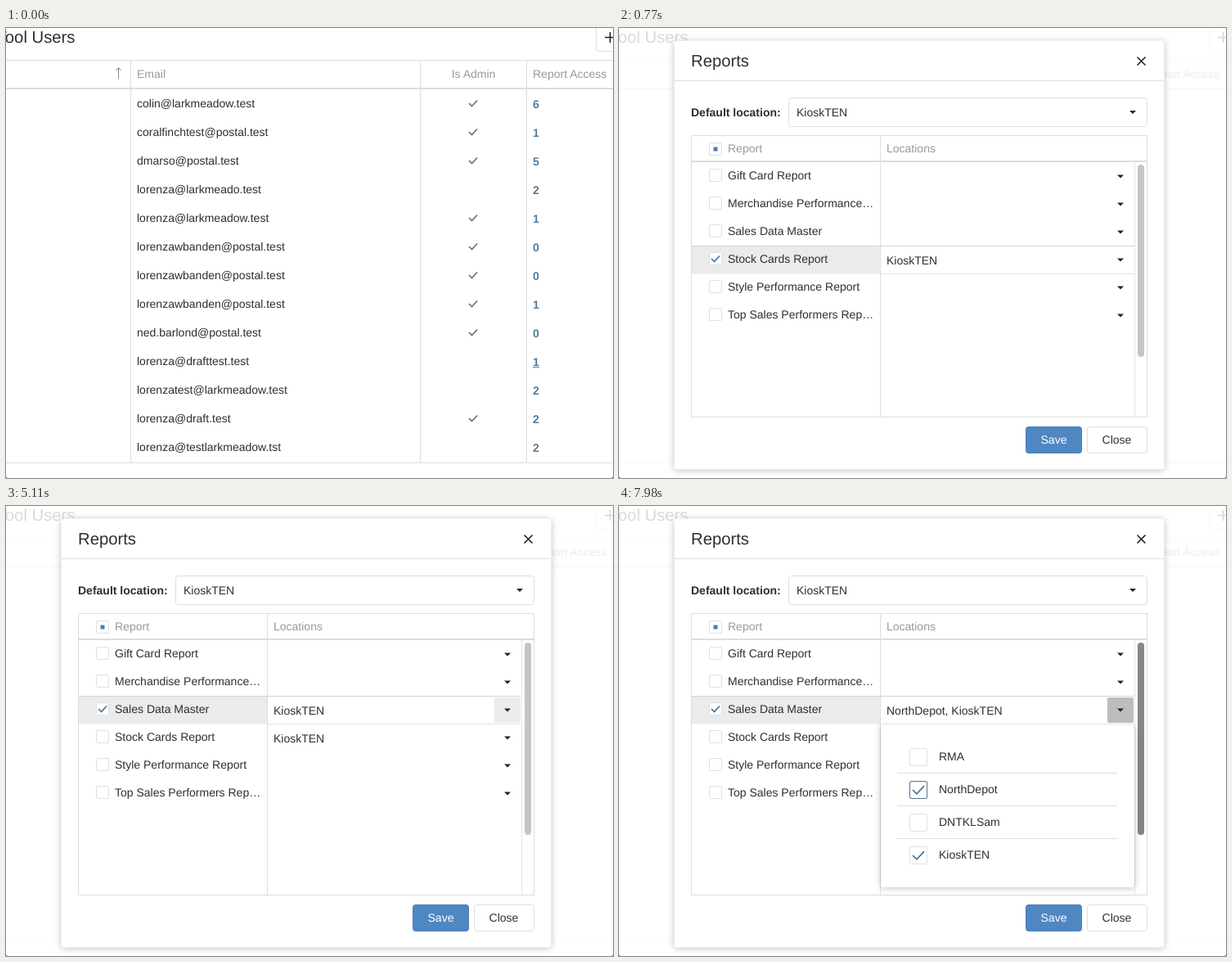
Animation, 742 px wide and 550 px high, one loop 8 s. Source, as an HTML page:

```html
<!DOCTYPE html>
<html lang="en">
<head>
<meta charset="utf-8">
<title>Report access</title>
<style>
  html, body { margin: 0; width: 100%; height: 100%; overflow: hidden; background: #fff; }
  svg { display: block; width: 742px; height: 550px; }
  text {
    font: 14px "Liberation Sans", Arial, sans-serif; fill: #2f2f2f;
    white-space: pre; text-rendering: geometricPrecision;
  }
  .big { font-size: 20.3px; }
  .bold { font-weight: bold; }
  .head { fill: #999; }
  .num { font-weight: bold; fill: #557a96; }
  .mid { text-anchor: middle; }
  .end { text-anchor: end; }
  .white { fill: #fff; }
  .box { fill: #fff; stroke: #e0e0e0; }
  .hover { fill: none; stroke: #4f7596; }
  .tick { fill: none; stroke: #4a7396; stroke-width: 1.7; }
  .dim { stroke: #5f7585; }
  .icon { fill: none; stroke: #222; stroke-width: 1.6; }
  .shade { filter: drop-shadow(0 1px 4px rgba(0, 0, 0, .25)); }
</style>
</head>
<body>
<svg id="stage" viewBox="0 0 742 550"></svg>
<script>
const LOOP = 8000, STEP = 70;

// Each change: start time, new value, number of steps it takes.
const tracks = {
  underline: [[0, 1], [140, 0]],
  mask: [[280, 1]],
  modal: [[280, .35], [420, 1, 2]],
  partial: [[0, 1], [2870, 0], [4060, 1]],
  hover3: [[2170, 1], [3430, 0, 3]],
  tick3: [[0, 1], [2660, 0]],
  row3: [[0, 1], [2870, 0]],
  hover2: [[3780, 1], [4340, 0, 3]],
  tick2: [[3990, 1]],
  row2: [[4060, 1]],
  one: [[4060, 1], [6790, 0]],
  both: [[6790, 1]],
  buttonHover: [[4480, 1, 3]],
  buttonOpen: [[5670, 1, 3]],
  itemHover1: [[5670, 1, 3]],
  itemTick1: [[6510, 1]],
  itemHover2: [[7070, 1], [7140, 0, 2]],
  itemHover3: [[7140, 1, 2], [7770, 0, 3]],
  bar: [[7770, 1, 4]]
};
const popupTrack = [[5180, 1, 2]];

const users = [
  ['colin@larkmeadow.test', 1, 6],
  ['coralfinchtest@postal.test', 1, 1],
  ['dmarso@postal.test', 1, 5],
  ['lorenza@larkmeado.test', 0, 2],
  ['lorenza@larkmeadow.test', 1, 1],
  ['lorenzawbanden@postal.test', 1, 0],
  ['lorenzawbanden@postal.test', 1, 0],
  ['lorenzawbanden@postal.test', 1, 1],
  ['ned.barlond@postal.test', 1, 0],
  ['lorenza@drafttest.test', 0, 1],
  ['lorenzatest@larkmeadow.test', 0, 2],
  ['lorenza@draft.test', 1, 2],
  ['lorenza@testlarkmeadow.tst', 0, 2]
];
const reports = ['Gift Card Report', 'Merchandise Performance…', 'Sales Data Master',
  'Stock Cards Report', 'Style Performance Report', 'Top Sales Performers Rep…'];
const places = ['RMA', 'NorthDepot', 'DNTKLSam', 'KioskTEN'];
const store = places[3];

const text = (x, y, s, cls = '') => `<text x="${x}" y="${y}" class="${cls}">${s}</text>`;
const rect = (x, y, w, h, attrs) => `<rect x="${x}" y="${y}" width="${w}" height="${h}" ${attrs}/>`;
const line = (d, color = '#ddd', width = 1) =>
  `<path d="${d}" fill="none" stroke="${color}" stroke-width="${width}"/>`;
const part = (id, s) => `<g id="${id}">${s}</g>`;
const caret = (x, y) => `<path d="M${x - 4} ${y - 2}h8l-4 4z" fill="#222"/>`;
const tick = (x, y, k = 1, cls = '') =>
  `<path class="tick ${cls}" d="M${x - 5 * k} ${y}l${3.5 * k} ${3.5 * k}l${6.5 * k} ${-7 * k}"/>`;
const box = (x, y, size, cls = 'box') =>
  rect(x - size / 2 + .5, y - size / 2 + .5, size - 1, size - 1, `rx="1.5" class="${cls}"`);

function page() {
  const rows = users.map(([mail, admin, count], i) => {
    const y = 97 + 35 * i;
    return text(160, y, mail) + text(644, y + 1, count, 'num') +
      (admin ? tick(571, y - 5, 1, 'dim') : '');
  }).join('');
  return text(84.5, 18, 'Tool Users', 'big end') +
    rect(721.5, -6.5, 40, 35, 'rx="3" fill="#fff" stroke="#ddd"') +
    '<path class="icon" d="M732 11.5h13M738.5 5v13"/>' +
    line('M0 39.5H742M152.5 39V531M506.5 39V531M636.5 39V531M0 531.5H742') +
    line('M0 74H742', '#ddd', 2) +
    line('M137.5 62V49M134.5 52l3-3.5l3 3.5', '#888') +
    text(160, 61, 'Email', 'head') + text(571.5, 61, 'Is Admin', 'head mid') +
    text(644, 61, 'Report Access', 'head') + rows +
    part('underline', line('M644 414.5h8', '#557a96'));
}

function selected(i) {
  const y = 164.5 + 34 * i;
  return rect(89, y, 230, 34, 'fill="#ebebeb"') +
    line(`M89 ${y}H630`, '#d4d4d4') + line(`M320 ${y + 34}H630`, '#e2e2e2');
}

function reportRow(name, i) {
  const y = 180 + 34 * i;
  let s = box(118, y, 16) + text(133, y + 5, name);
  if (i === 2 || i === 3)
    s += part('tick' + i, tick(118, y)) + part('hover' + i, box(118, y, 16, 'hover'));
  if (i === 2)
    s += part('buttonHover', rect(597, 234, 32, 31, 'rx="2" fill="#ebebeb"')) +
      part('buttonOpen', rect(597, 234, 32, 31, 'rx="2" fill="#bdbdbd"')) +
      part('one', text(327, 255, store)) +
      part('both', text(327, 255, `${places[1]}, ${store}`));
  if (i === 3) s += text(327, 289, store);
  return s + caret(613, y + 1.5);
}

function popup() {
  const items = places.map((name, i) => {
    const y = 307 + 40 * i;
    let s = text(391, y + 4, name) + box(366, y, 22);
    if (i === 1) s += part('itemTick1', tick(366, y, 1.4));
    if (i === 3) s += tick(366, y, 1.4);
    if (i) s += part('itemHover' + i, box(366, y, 22, 'hover')) + line(`M340 ${y - 20.5}H609`);
    return s;
  }).join('');
  return '<g clip-path="url(#drop)"><g id="popup">' +
    '<path class="shade" d="M320 267H630V462q0 4-4 4H324q-4 0-4-4z" fill="#fff"/>' +
    items + '</g></g>';
}

function dialog() {
  return rect(67.5, 15.5, 599, 524, 'rx="4" fill="#fff" class="shade"') +
    text(88, 47, 'Reports', 'big') + line('M68 64.5H666') +
    '<path class="icon" d="M633.5 35.5l10 10m0-10l-10 10"/>' +
    text(88, 108, 'Default location:', 'bold') +
    rect(207.5, 85.5, 438, 35, 'rx="3" fill="#fff" stroke="#ddd"') +
    text(217, 108, store) + caret(628, 103) +
    part('row2', selected(2)) + part('row3', selected(3)) +
    rect(88.5, 131.5, 557, 344, 'fill="none" stroke="#ddd"') +
    line('M319.5 131V475') + line('M630.5 164V475', '#e6e6e6') +
    line('M89 163H645', '#ddd', 2) +
    box(118, 148, 16) + part('partial', rect(115.5, 145.5, 5, 5, 'fill="#4a7fb6"')) +
    text(133, 152, 'Report', 'head') + text(327, 152, 'Locations', 'head') +
    reports.map(reportRow).join('') +
    rect(634, 167, 8, 235, 'rx="4" fill="#c5c5c5"') +
    part('bar', rect(634, 167, 8, 235, 'rx="4" fill="#868686"')) +
    rect(497.5, 487.5, 68, 32, 'rx="3" fill="#4f87c3" stroke="#477db8"') +
    text(531.5, 508, 'Save', 'mid white') +
    rect(572.5, 487.5, 73, 32, 'rx="3" fill="#fff" stroke="#ddd"') +
    text(608.5, 508, 'Close', 'mid') + popup();
}

const stage = document.getElementById('stage');
stage.innerHTML = '<clipPath id="drop"><path d="M308 267H642V482H308z"/></clipPath>' + page() +
  part('mask', rect(0, 0, 742, 550, 'fill="#fff" fill-opacity=".82"')) +
  part('modal', dialog()) +
  '<path d="M0 547q0 3 3 3H0zM742 547q0 3-3 3h3z" fill="#888"/>';

const find = id => document.getElementById(id);
const parts = Object.entries(tracks).map(([id, track]) => [find(id), track]);
const modal = find('modal'), menu = find('popup');

function valueAt(track, t) {
  let v = 0;
  for (const [start, goal, steps = 1] of track)
    if (t >= start) v += (goal - v) * Math.min(1, (t - start + STEP) / (steps * STEP));
  return v;
}

function render(now) {
  const t = Math.floor(now % LOOP / STEP) * STEP;
  for (const [el, track] of parts) el.setAttribute('opacity', valueAt(track, t));

  // The dialog zooms in with a quadratic ease-out.
  const u = t < 420 ? 0 : Math.min(1, (t - 280) / 490);
  const k = 1 - .28 * (1 - u) ** 2;
  modal.setAttribute('transform', `translate(367 277.5) scale(${k}) translate(-367 -277.5)`);

  const open = valueAt(popupTrack, t);
  menu.setAttribute('transform', `translate(0 ${-215 * (1 - open)})`);
  menu.setAttribute('visibility', open ? 'visible' : 'hidden');
}

const began = performance.now();
function loop() {
  render(performance.now() - began);
  requestAnimationFrame(loop);
}
loop();
</script>
</body>
</html>
```
